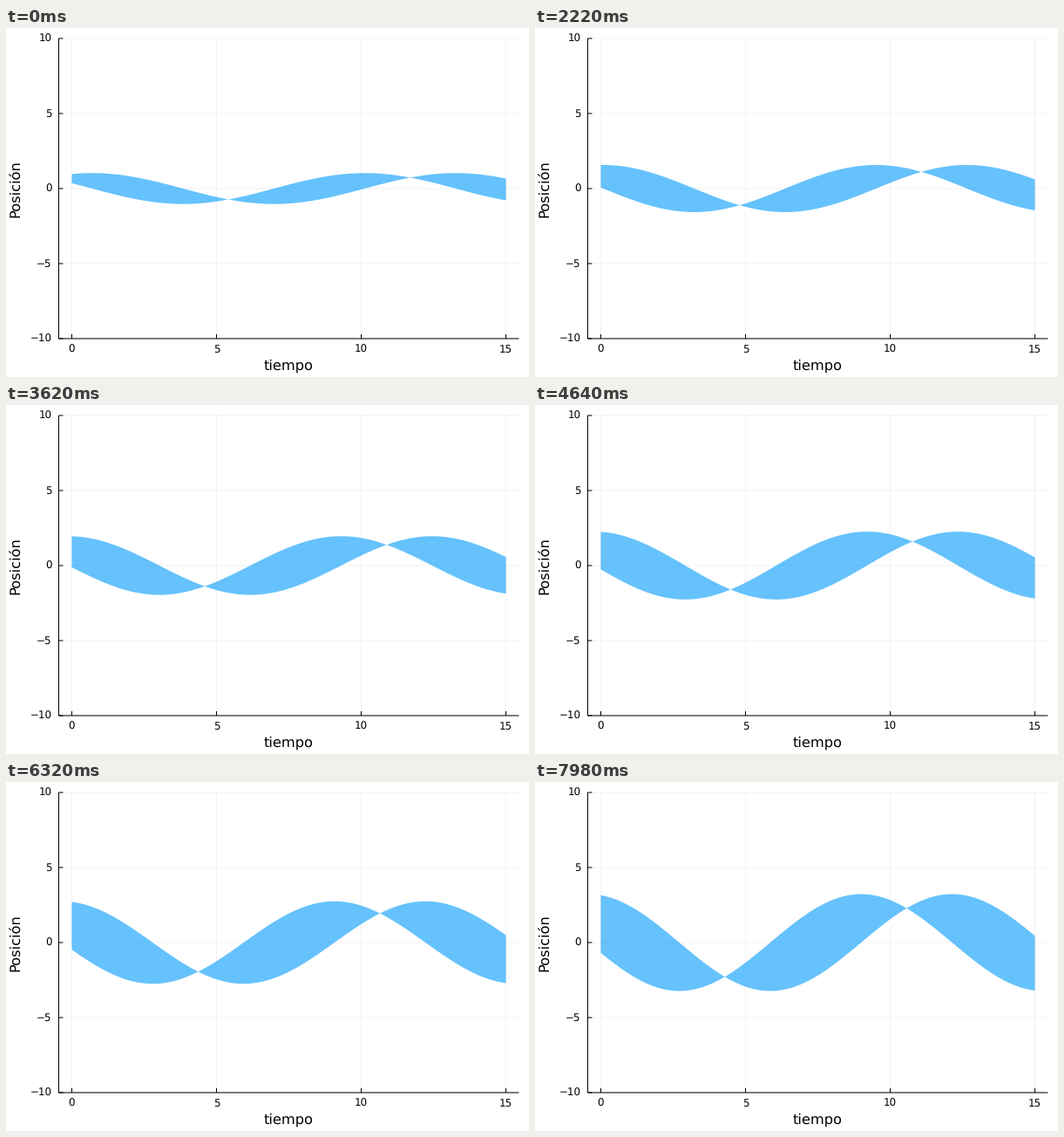
Write a matplotlib script that moves like this. It is 600 px wide and 400 px high and loops after 8 s.

```python
import numpy as np
import matplotlib.pyplot as plt
from matplotlib.animation import FuncAnimation
from matplotlib.patches import Polygon

W, H, DPI = 600, 400, 100
STEP, LOOP = 20, 8000
PT = 72 / DPI
LEFT, RIGHT, TOP, BOTTOM = 60.5, 588.4, 12, 356
TICK = 5
TICK_SIZE, GUIDE_SIZE = 11.85, 16.3

plt.rcParams["font.family"] = "DejaVu Sans"
plt.rcParams["text.hinting"] = "no_hinting"
fig = plt.figure(figsize=(W / DPI, H / DPI), dpi=DPI, facecolor="white")
ax = fig.add_axes([0, 0, 1, 1])
ax.set_xlim(0, W)
ax.set_ylim(H, 0)
ax.axis("off")


def px(t):
    return 75.5 + 33.2 * t


def py(v):
    return 184 - 17.2 * v


def line(x0, y0, x1, y1, width=1.0, alpha=1.0, z=3):
    ax.plot([x0, x1], [y0, y1], color="black", alpha=alpha, lw=width * PT,
            zorder=z, solid_capstyle="butt", snap=False)


def grid(x0, y0, x1, y1):
    line(x0, y0, x1, y1, width=0.5, alpha=0.1, z=1)


def label(x, y, text, size, ha="center", **kw):
    ax.text(x, y, text, fontsize=size * PT, color="black", ha=ha,
            va="baseline", **kw)


def number(v):
    return str(v).replace("-", "\u2212")


for t in (0, 5, 10, 15):
    x = px(t)
    grid(x, TOP, x, BOTTOM)
    line(x, BOTTOM, x, BOTTOM - TICK)
    label(x, 371.5, number(t), TICK_SIZE)
for v in (-10, -5, 0, 5, 10):
    y = py(v)
    grid(LEFT, y, RIGHT, y)
    line(LEFT, y, LEFT + TICK, y)
    label(52.5, y + 4, number(v), TICK_SIZE, ha="right")
line(LEFT, TOP, LEFT, BOTTOM)
line(LEFT, BOTTOM, RIGHT, BOTTOM)
label(324.5, 392, "tiempo", GUIDE_SIZE)
label(16.3, 183.7, "Posición", GUIDE_SIZE, rotation=90,
      rotation_mode="anchor")

times = np.linspace(0, 15, 301)
xs = px(times)
cos, sin = np.cos(times / 2), np.sin(times / 2)
band = Polygon([(0, 0)] * 3, closed=True, facecolor="#009AFA", alpha=0.6,
               lw=0, zorder=2, snap=False)
ax.add_patch(band)


def state_index(ms):
    # Each 140 ms holds three states for 20, 100 and 20 ms.
    cycle, rest = divmod(ms, 140)
    return 3 * cycle + (rest >= 20) + (rest >= 120)


def update(i):
    k = state_index(i * STEP)
    a = 0.968 + 0.01278 * k
    b = 0.353 - 0.00608 * k
    first = py(a * cos + b * sin)
    second = py(b * cos - a * sin)
    band.set_xy(np.column_stack([np.r_[xs, xs[::-1]],
                                 np.r_[first, second[::-1]]]))
    return [band]


anim = FuncAnimation(fig, update, frames=LOOP // STEP, interval=STEP,
                     init_func=lambda: update(0), repeat=True,
                     repeat_delay=0, blit=False)
plt.show()
```
